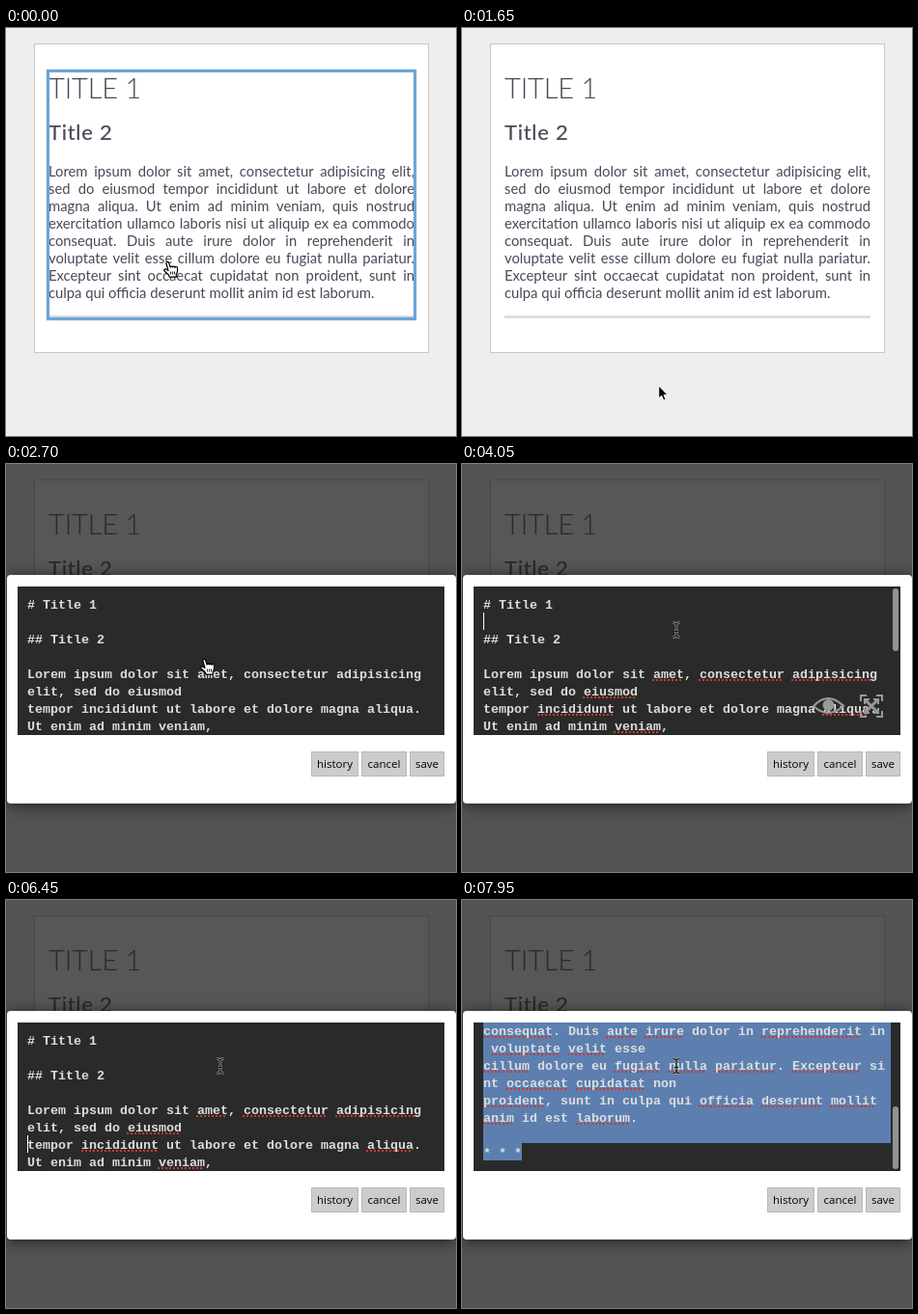
These frames come from a looping animation (466 px wide and 423 px high, 8000 ms). An HTML page:

```html
<!DOCTYPE html>
<html lang="en">
<head>
<meta charset="utf-8">
<title>Markdown block editor</title>
<style>
html, body { margin: 0; width: 100%; height: 100%; overflow: hidden; }
body { position: relative; background: #eee; }
div, svg { position: absolute; box-sizing: border-box; }
[hidden] { display: none !important; }
#page { left: 29px; top: 16px; width: 409px; height: 321px; background: #fff; border: 1px solid #c8c8c8; }
.copy { left: 44px; white-space: nowrap; color: #4a4858; font-family: Lato, sans-serif; }
#h1 { top: 47px; font-size: 29px; line-height: 29px; font-weight: 300; letter-spacing: -.15px; }
#h2 { top: 97px; font-size: 22px; line-height: 22px; letter-spacing: .75px; -webkit-text-stroke: .2px; }
#para { top: 139px; width: 379px; font-size: 14.8px; line-height: 18px; }
#para p { margin: 0; text-align-last: justify; }
#para p:last-child { text-align-last: left; }
#rule { left: 44px; top: 298px; width: 379px; height: 3px; background: #ddd; }
#focus { left: 42px; top: 43px; width: 383px; height: 260px; border: 3px solid #6ba5d7; box-shadow: 0 0 1px #6ba5d7, inset 0 0 1px #6ba5d7; }
#shade { inset: 0; background: rgba(30, 31, 30, .75); }
#dialog { left: 1px; top: 115px; width: 465px; height: 237px; background: #fff; border-radius: 4px; box-shadow: 0 2px 16px rgba(0, 0, 0, .6); }
#editor { left: 11px; top: 12px; width: 442px; height: 154px; overflow: hidden; background: #2a2a2a; }
#text { left: 10px; top: 9px; width: 422px; color: #ddd; font: bold 13.333px/18px "Liberation Mono", monospace; }
.line { width: 422px; height: 18px; white-space: pre; }
.line span { position: relative; top: 2px; }
.picked .line { background: #5c7fb0; }
.picked .line:last-child { width: 40px; }
.spell u { text-decoration: underline dotted #d2382a 2px; text-underline-offset: 1px; text-decoration-skip-ink: none; }
u { text-decoration: none; }
#caret { left: 10px; width: 1px; height: 18px; background: #fff; }
#thumb { left: 434px; width: 6px; height: 65px; border-radius: 3px; background: #929292; }
#icons { left: 350px; top: 110px; fill: none; stroke: #999; }
.button { top: 183px; height: 26px; background: #ccc; border: 1px solid #b8b8b8; color: #000; text-align: center; font: 500 11.5px/24px "Open Sans", sans-serif; }
#cursor { left: 0; top: 0; overflow: visible; }
</style>
</head>
<body>
<div id="page"></div>
<div id="h1" class="copy">TITLE 1</div>
<div id="h2" class="copy">Title 2</div>
<div id="para" class="copy">
  <p>Lorem ipsum dolor sit amet, consectetur adipisicing elit,</p>
  <p>sed do eiusmod tempor incididunt ut labore et dolore</p>
  <p>magna aliqua. Ut enim ad minim veniam, quis nostrud</p>
  <p>exercitation ullamco laboris nisi ut aliquip ex ea commodo</p>
  <p>consequat. Duis aute irure dolor in reprehenderit in</p>
  <p>voluptate velit esse cillum dolore eu fugiat nulla pariatur.</p>
  <p>Excepteur sint occaecat cupidatat non proident, sunt in</p>
  <p>culpa qui officia deserunt mollit anim id est laborum.</p>
</div>
<div id="rule"></div>
<div id="focus"></div>
<div id="shade" hidden>
  <div id="dialog">
    <div id="editor">
      <div id="text"></div>
      <div id="caret"></div>
      <svg id="icons" width="80" height="30">
        <path d="M2 14Q17 -2 33 14Q17 28 2 14Z" stroke-width="2"/>
        <circle cx="17.5" cy="13" r="5.5" fill="#999"/>
        <path d="M51 9V3h6M67 3h6v6M73 19v6h-6M57 25h-6v-6" stroke-width="2"/>
        <path d="M56 8L68 20M68 8L56 20" stroke-width="3"/>
        <path d="M55 12V7h5M64 7h5v5M69 16v5h-5M60 21h-5v-5" stroke-width="2"/>
      </svg>
      <div id="thumb"></div>
    </div>
    <div class="button" style="left:315px;width:49px">history</div>
    <div class="button" style="left:367px;width:47px">cancel</div>
    <div class="button" style="left:417px;width:36px">save</div>
  </div>
</div>
<svg id="cursor" width="17" height="19">
  <g id="hand" fill="#fff" stroke="#000" stroke-width="1.2" stroke-linejoin="round">
    <path d="M5 10.5L2.9 3a1.4 1.4 0 0 1 2.6-.9L7.1 7a1.3 1.3 0 0 1 2.5 0 1.3 1.3 0 0 1 2.5.3 1.2 1.2 0 0 1 2.4.8V12l-1.2 2.5V17.2H6.3L5.3 15 .9 10.8A1.3 1.3 0 0 1 2.6 9Z"/>
    <path d="M7.6 11.5v3M9.6 11.5v3M11.6 11.5v3" stroke-width=".9"/>
  </g>
  <path id="arrow" d="M.7 .9V14l3-2.8 2 4.9 2.3-1-2-4.7h4Z" stroke="#fff"/>
  <g id="beam" fill="none">
    <path d="M1.5 1.5Q5 1.5 5 4Q5 1.5 8.5 1.5M5 4V14M1.5 16.5Q5 16.5 5 14Q5 16.5 8.5 16.5M3 10.5H7" stroke="#aaa" stroke-width="2.6"/>
    <path d="M1.5 1.5Q5 1.5 5 4Q5 1.5 8.5 1.5M5 4V14M1.5 16.5Q5 16.5 5 14Q5 16.5 8.5 16.5M3 10.5H7" stroke="#111" stroke-width="1.2"/>
  </g>
</svg>
<script>
const LOOP = 8000, STEP = 150;
const $ = id => document.getElementById(id);
const show = (id, on) => $(id).toggleAttribute('hidden', !on);

// Underscores enclose the words the spell checker marks.
const lines = `# Title 1

## Title 2

Lorem ipsum dolor sit _amet_, _consectetur_ _adipisicing_
elit, sed do _eiusmod_
tempor _incididunt_ ut labore et dolore magna _aliqua_.
Ut enim ad minim _veniam_,
_quis_ _nostrud_ _exercitation_ _ullamco_ _laboris_ _nisi_ ut
_aliquip_ ex ea _commodo_
_consequat_. Duis _aute_ _irure_ dolor in _reprehenderit_ in
 _voluptate_ _velit_ esse
_cillum_ dolore eu _fugiat_ _nulla_ _pariatur_. _Excepteur_ si
nt _occaecat_ _cupidatat_ non
_proident_, sunt in culpa qui _officia_ _deserunt_ _mollit_
_anim_ id est _laborum_.

* * *`.split('\n');
$('text').innerHTML = lines.map((s, i) =>
  `<div class="line" style="top:${i * 18}px"><span>${s.replace(/_(\w+?)_/g, '<u>$1</u>')}</span></div>`).join('');

// Each entry: start time, then values held until the next entry.
const moves = [
  [0, 163, 241], [150, 166, 215], [300, 172, 165], [450, 180, 95], [600, 190, 29],
  [750, 191, 80], [900, 191, 190], [1050, 191, 281], [1200, 196, 325], [1350, 200, 362],
  [1500, 202, 374], [1650, 203, 370], [1800, 203, 335], [1950, 202, 262], [2100, 201, 205],
  [2250, 201, 201], [3600, 209, 176], [3750, 217, 163]];
const caretRows = [[0, -1], [4050, 1], [4650, 2], [4950, -1], [5100, 3], [5250, 4],
  [5400, 5], [5700, 6], [6000, 7], [6450, 6], [6900, -1]];
const scrolls = [[0, 0], [7050, 24], [7500, 60], [7650, 115], [7800, 165], [7950, 190]];
const held = (track, t) => track.findLast(k => k[0] <= t).slice(1);
const clamp = v => Math.max(0, Math.min(1, v));

function draw(now) {
  const t = Math.floor(now % LOOP / STEP) * STEP;
  const [x, y] = held(moves, t), [row] = held(caretRows, t), [scroll] = held(scrolls, t);
  const editing = t >= 2700, selected = t >= 6900;
  const kind = t >= 3600 ? 'beam' : y > 43 && y < 300 ? 'hand' : 'arrow';
  for (const k of ['hand', 'arrow', 'beam']) show(k, k === kind);
  $('cursor').style.transform = `translate(${x}px,${y}px)`;
  show('focus', !editing && kind === 'hand');
  show('shade', editing);

  const fade = clamp((4650 - t) / 600);
  $('icons').style.opacity = t < 3600 ? 0 : t < 3750 ? .5 : fade;
  $('thumb').style.opacity = selected ? 1 : t < 4050 ? 0 : fade;
  $('thumb').style.top = 2 + scroll * 85 / 190 + 'px';
  $('text').style.transform = `translateY(${-scroll}px)`;
  $('text').classList.toggle('spell', t >= 4050);
  $('text').classList.toggle('picked', selected);
  show('caret', row >= 0);
  $('caret').style.top = 9 + row * 18 + 'px';
}

let start;
function tick(now) {
  start ??= now;
  draw(now - start);
  requestAnimationFrame(tick);
}
draw(0);
requestAnimationFrame(tick);
</script>
</body>
</html>
```
